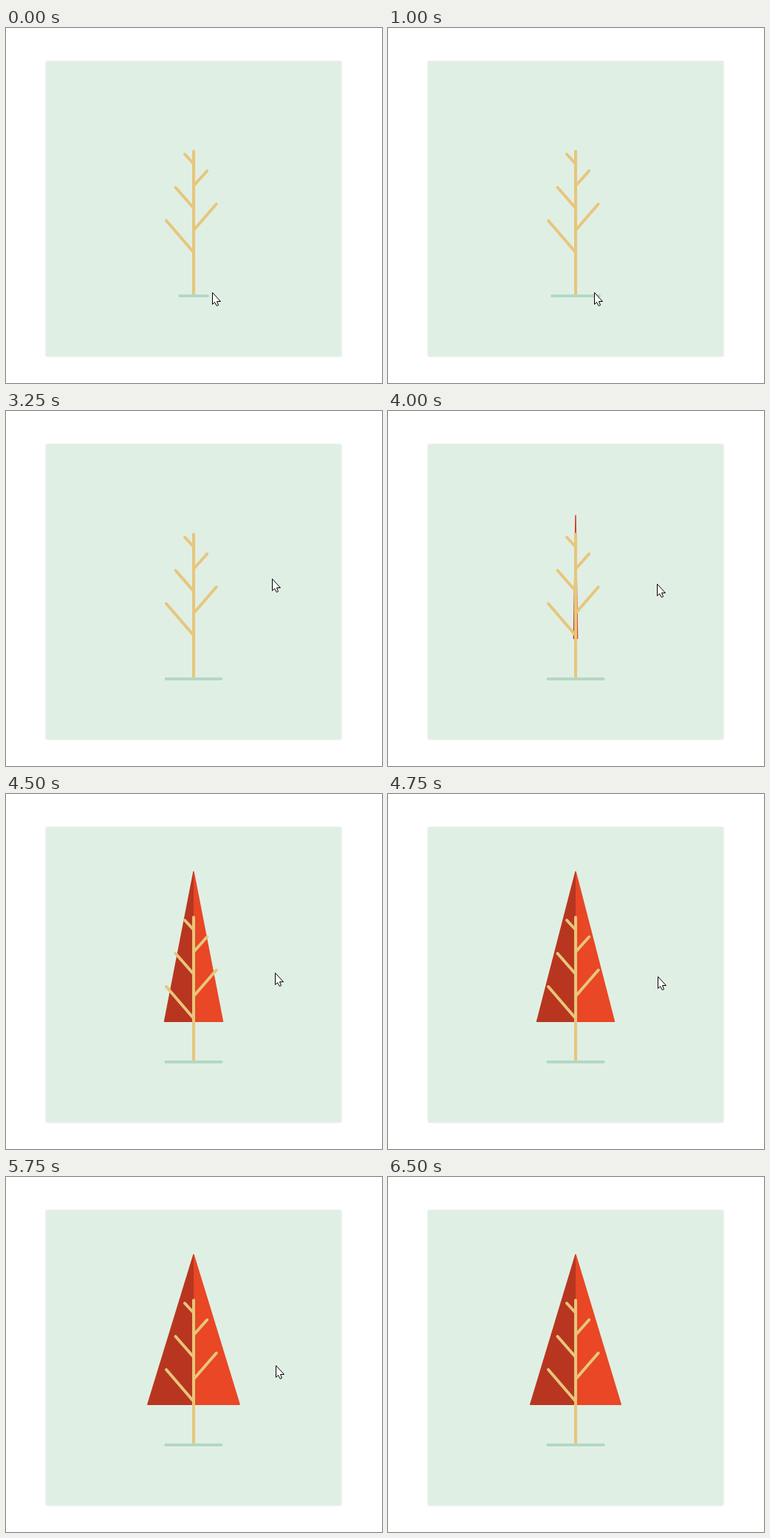
Animation, 509 px wide and 481 px high, one loop 7500 ms. Source, as an HTML page:

```html
<!DOCTYPE html>
<html lang="en">
<head>
<meta charset="utf-8">
<title>Growing tree</title>
<style>
  html, body { margin: 0; width: 100%; height: 100%; overflow: hidden; background: #fff; }
  svg { display: block; width: 509px; height: 481px; }
  .card { fill: #e0efe4; filter: drop-shadow(.5px .5px 1.2px #d9dedb); }
  .line { fill: none; stroke-width: 4; stroke-linecap: round; }
  .wood { stroke: #e7c67b; }
  .soil { stroke: #b3d8c4; }
  .leaf { fill: url(#halves); stroke: url(#halves); stroke-width: 1.5; stroke-linejoin: round; }
  .cursor { fill: #fff; stroke: #000; }
</style>
</head>
<body>
<svg viewBox="0 0 509 481">
  <linearGradient id="halves" gradientUnits="userSpaceOnUse" x1="154" x2="354">
    <stop offset=".5" stop-color="#b8361f"/>
    <stop offset=".5" stop-color="#e94725"/>
  </linearGradient>
  <rect class="card" x="54" y="45" width="400" height="400" rx="2"/>
  <path id="leaf" class="leaf"/>
  <path id="wood" class="line wood"/>
  <path id="ground" class="line soil"/>
  <path id="cursor" class="cursor" d="M.5 .5V16.5L3.5 13.5 6.3 18.5 8.5 17.5 6.5 12.5H11.5Z"/>
</svg>
<script>
const LOOP = 7500, STEP = 250, CX = 254, BASE = 308.3;
const $ = id => document.getElementById(id);
const shape = (id, d) => $(id).setAttribute('d', d);
const mix = (a, b, p) => a + (b - a) * p;
const progress = (t, from, to) => Math.min(1, Math.max(0, (t - from) / (to - from)));
const smooth = p => p * p * (3 - 2 * p);

// Approach to 1 with a slight overshoot
function spring(t) {
  const decay = 0.00244, turn = 0.00196;
  return 1 - Math.exp(-decay * t) * (Math.cos(turn * t) + decay / turn * Math.sin(turn * t));
}

// Trunk with alternating branches, longer towards the ground
function tree() {
  let d = `M${CX} 167V361`;
  for (let i = 0; i < 5; i++) {
    const side = i % 2 ? 1 : -1;
    d += `M${CX} ${184 + 30 * i}l${side * (12 + 6.25 * i)} ${-13 - 7.5 * i}`;
  }
  return d;
}

function cursorAt(t) {
  if (t < 1500) return [279, 358];
  if (t < 3250) {
    const p = smooth(progress(t, 2500, 3250));
    return [mix(385, 360, p), mix(234, 227, p)];
  }
  const p = progress(t, 3250, 5600);
  return [mix(360, 364.6, 1 - (1 - p) ** 4), mix(227, 255, smooth(p))];
}

function draw(t) {
  const half = 37.7 - 18.7 * Math.exp(-t / 850);
  shape('ground', `M${CX - half} 363H${CX + half}`);

  const age = t - 3900;
  const w = 61.2 * spring(age), h = 203 * (1 - Math.exp(-age / 58));
  shape('leaf', age > 0 ? `M${CX} ${BASE - h}L${CX + w} ${BASE}H${CX - w}Z` : '');

  const shown = t < 1500 || (t >= 2500 && t < 6500);
  const [x, y] = cursorAt(t).map(Math.round);
  $('cursor').setAttribute('visibility', shown ? 'visible' : 'hidden');
  $('cursor').setAttribute('transform', `translate(${x} ${y})`);
}

shape('wood', tree());
const start = performance.now();
function tick() {
  const t = (performance.now() - start) % LOOP;
  draw(Math.floor(t / STEP) * STEP);
  requestAnimationFrame(tick);
}
tick();
</script>
</body>
</html>
```
